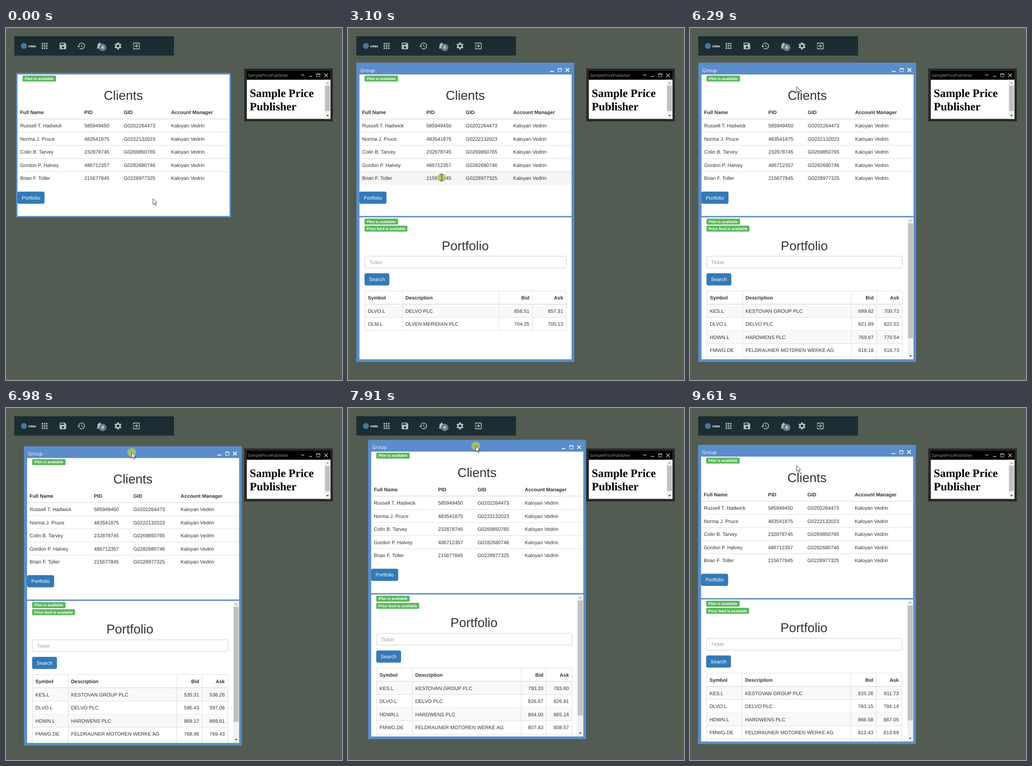
Animation, 732 px wide and 765 px high, one loop 9.69 s. Source, as an HTML page:

```html
<!DOCTYPE html>
<html lang="en">
<head>
<meta charset="utf-8">
<title>Client portfolio windows</title>
<style>
  html, body { margin: 0; width: 732px; height: 765px; overflow: hidden; background: #525c52; }
  svg { display: block; }
  text { font: 10.85px "Liberation Sans", Arial, sans-serif; fill: #333; text-rendering: geometricPrecision; white-space: pre; }
  .b { font-weight: bold; }
  .h1 { font-size: 27.9px; text-anchor: middle; }
  .tag { font-size: 8.13px; font-weight: bold; fill: #fff; text-anchor: middle; }
  .btn { fill: #fff; text-anchor: middle; }
  .hint { fill: #999; }
  .r { text-anchor: end; }
  .ui { font-family: "Open Sans", "Noto Sans", sans-serif; fill: #fff; }
  .serif { font: bold 24.77px "Liberation Serif", "Times New Roman", serif; fill: #000; }
  .line { stroke: #ddd; fill: none; }
  .blue { fill: #5a8dca; }
  .icon { fill: #b4bfc1; }
</style>
</head>
<body>
<svg width="732" height="765" viewBox="0 0 732 765">
  <defs>
    <clipPath id="lower"><rect x="25" y="101" width="462" height="288.5"/></clipPath>
    <clipPath id="torn"><rect x="25" y="101" width="228" height="228"/></clipPath>
    <clipPath id="bottom"><rect x="25" y="411.5" width="462" height="308.5"/></clipPath>
    <linearGradient id="barFill" x2="0" y2="1">
      <stop stop-color="#1a2a31"/><stop offset="1" stop-color="#1e2e34"/>
    </linearGradient>
  </defs>

  <g id="toolbar">
    <rect x="18" y="18" width="348" height="42" fill="url(#barFill)"/>
    <circle cx="39" cy="39" r="6.5" fill="#46789c"/>
    <text class="ui b" x="48.5" y="42" style="font-size:6px">ORBA</text>
    <g class="icon">
      <path transform="translate(74.4 29.4) scale(.8)" d="M4 6h16M4 12h16M4 18h16" stroke="#b4bfc1" stroke-width="4" stroke-dasharray="4 2"/>
      <path transform="translate(114.4 29.4) scale(.8)" d="M17 3H5a2 2 0 0 0-2 2v14a2 2 0 0 0 2 2h14a2 2 0 0 0 2-2V7zM12 19a3 3 0 1 1 0-6 3 3 0 0 1 0 6zM15 9H5V5h10z"/>
      <path transform="translate(154.4 29.4) scale(.8)" d="M13 3a9 9 0 0 0-9 9H1l4 4 4-4H6a7 7 0 1 1 2.06 4.94l-1.42 1.42A9 9 0 1 0 13 3zM12 8v5l4.3 2.5.7-1.2-3.5-2V8z"/>
      <path transform="translate(194.4 29.4) scale(.8)" d="M12 22a2 2 0 0 0 2-2h-4a2 2 0 0 0 2 2zM18 16v-5c0-3-1.6-5.6-4.5-6.3V4a1.5 1.5 0 0 0-3 0v.7C7.6 5.4 6 8 6 11v5l-2 2v1h16v-1z"/>
      <g transform="translate(244 39) scale(.8)" fill="none" stroke="#b4bfc1">
        <circle r="5.5" stroke-width="4"/>
        <circle r="8.2" stroke-width="3.4" pathLength="12" stroke-dasharray="1 1" stroke-dashoffset="-.5"/>
      </g>
      <path transform="translate(274.4 29.4) scale(.8)" d="M10 15.6 11.5 17l5-5-5-5L10 8.4 12.7 11H3v2h9.7zM19 3H5a2 2 0 0 0-2 2v4h2V5h14v14H5v-4H3v4a2 2 0 0 0 2 2h14a2 2 0 0 0 2-2V5a2 2 0 0 0-2-2z"/>
    </g>
    <circle cx="210.7" cy="42.3" r="8" fill="#6b7b87"/>
    <text class="ui b" x="210.7" y="45.4" text-anchor="middle" style="font-size:8.5px">0</text>
  </g>

  <g id="publisher">
    <rect x="519" y="88" width="193" height="115" fill="#282828"/>
    <rect x="524.7" y="93" width="182" height="20"/>
    <rect x="524.7" y="112.5" width="182" height="85" fill="#fff"/>
    <text class="ui" x="527" y="106" style="font-size:8.7px;fill:#a3a3a3">SamplePricePublisher</text>
    <g stroke="#b8b8b8" fill="none" stroke-width="1.6">
      <path d="M643 102.3h7M660 105.3h7M693.5 99l7.5 7.5m0-7.5-7.5 7.5"/>
      <path d="M676.5 106V99.5h7.5V106z" stroke-width="1"/><path d="M676 100h8.5" stroke-width="2"/>
    </g>
    <text class="serif" x="531" y="150.4">Sample Price</text>
    <text class="serif" x="531" y="178.8">Publisher</text>
    <g id="pubScroll"></g>
  </g>

  <g id="win">
    <rect id="solo" class="blue" x="22" y="97.5" width="468" height="314"/>
    <rect id="slab" class="blue" x="18" y="75.5" width="469" height="314"/>
    <g id="frame">
      <rect class="blue" x="18.2" y="75.4" width="474.6" height="650.4"/>
      <text class="ui" x="27" y="95.6">Group</text>
      <g stroke="#fff" fill="none" stroke-width="1.8">
        <path d="M440 94.5h8M474 87.5l8 7.5m0-7.5-8 7.5"/>
        <path d="M457.5 95V88h7.5v7z" stroke-width="1"/><path d="M457 88.5h8.5"/>
      </g>
      <rect x="25" y="411.5" width="462" height="308.5" fill="#fff"/>
    </g>
    <g id="pane"><g id="clients"></g></g>
    <g id="ghost" clip-path="url(#torn)"><use href="#clients" x="-3" y="-22.5"/></g>
    <g id="portfolio" clip-path="url(#bottom)"></g>
  </g>

  <circle id="press" r="9.5" fill="#b5cb57" opacity=".8"/>
  <g id="cursor" stroke-linejoin="round">
    <path id="arrow" d="M0 0v12.5l3-2.7 2.2 4.9 2.1-.9-2.1-4.7h4z" fill="#fff" stroke="#222" stroke-width=".9"/>
    <path id="hand" d="M-1.5 1.2a1.5 1.5 0 0 1 3 0V7l1-.8 1.5.7 1.2-.3 1 .9 1.2.1.6 1v4l-1.5 3v2.6H.5V16l-4.2-5.5c-.8-1.5.8-2.3 2.2-.6z" fill="#fff" stroke="#222"/>
    <path id="beam" d="M-3-6.5h2l1 .8 1-.8h2M0-6V6M-3 6.5h2l1-.8 1 .8h2" fill="none" stroke="#222"/>
  </g>
</svg>

<script>
const LOOP = 9690;
const $ = id => document.getElementById(id);
const show = (id, on) => { $(id).style.display = on ? '' : 'none'; };

// ---- drawing helpers
const text = (x, y, s, cls = '') => `<text x="${x}" y="${y}" class="${cls}">${s}</text>`;
const rect = (x, y, w, h, rest) => `<rect x="${x}" y="${y}" width="${w}" height="${h}" ${rest}/>`;
const line = (d, w = 1) => `<path class="line" d="${d}" stroke-width="${w}"/>`;
const tag = (y, w, s) => rect(36, y, w, 13, 'rx="2" fill="#5cb85c"') + text(36 + w / 2, y + 9.4, s, 'tag');
const button = (x, y, w, s, id) =>
  rect(x + .4, y + .4, w - .8, 25.5, `id="${id}" rx="3" fill="#337ab7" stroke="#2e6da4" stroke-width=".8"`) +
  text(x + w / 2, y + 17, s, 'btn');
const scrollbar = (x, y, h, thumb) => {
  const mid = x + 6.5, end = y + h;
  return rect(x, y, 13, h, 'fill="#f1f1f1"') + rect(x + 1, y + 13, 11, thumb, 'fill="#c1c1c1"') +
    `<path d="M${mid - 3} ${y + 8.5}h6l-3-3.5z" fill="#a3a3a3"/>` +
    `<path d="M${mid - 3} ${end - 8.5}h6l-3 3.5z" fill="#505050"/>`;
};

// ---- clients table
const ROW = 28.5, TOP = 198;
const people = [
  ['Russell T. Hadwick', '585949450', 'G0202264473'],
  ['Norma J. Pruce', '483541875', 'G0222132023'],
  ['Colin B. Tarvey', '232878745', 'G0269850765'],
  ['Gordon P. Halvey', '486712357', 'G0282680746'],
  ['Brian F. Toller', '215677845', 'G0228977325']
];
const clientCols = [30.7, 170.7, 256.6, 359.7];
const cells = (row, y, cls) => row.map((s, i) => text(clientCols[i], y, s, cls)).join('');

$('clients').innerHTML =
  rect(25, 101, 462, 307.5, 'fill="#fff"') + tag(103.2, 73, 'Plim is available') +
  text(255.6, 156, 'Clients', 'h1') +
  rect(25, 0, 462, ROW, 'id="hover" fill="#f5f5f5"') +
  cells(['Full Name', 'PID', 'GID', 'Account Manager'], 187.4, 'b') +
  line('M25 197.75H487', 1.5) +
  people.map((p, i) => cells([...p, 'Kaloyan Vedrin'], 216.4 + i * ROW) +
    (i ? line(`M25 ${TOP + i * ROW}H487`) : '')).join('') +
  button(24.8, 355.6, 59, 'Portfolio', 'open');
$('pubScroll').innerHTML = scrollbar(694, 112.5, 85, 55);

// ---- portfolio table
const kes = ['KES.L', 'KESTOVAN GROUP PLC'];
const del = ['DLVO.L', 'DELVO PLC'];
const har = ['HDWN.L', 'HARDWENS PLC'];
const fel = ['FMWG.DE', 'FELDRAUNER MOTOREN WERKE AG'];
const olv = ['OLM.L', 'OLVEN MERIDIAN PLC'];
const holdings = t => t < 3100 ? [] : t < 4400 ? [del, olv] : t < 5830 ? [kes, har] : [kes, del, har, fel];

const PRICE_TICK = 739;
const rand = n => { const v = Math.sin(n * 127.1 + 11.7) * 43758.5453; return v - Math.floor(v); };
function quote(tick, i) {
  const bid = 500 + 450 * rand(tick * 9 + i), spread = .1 + 1.5 * rand(tick * 9 + i + 50);
  return [bid, bid + spread].map(v => v.toFixed(2));
}

function drawPortfolio(stocks, tick, feed) {
  const long = stocks.length > 2;
  const cols = long ? [36.5, 114.5, 351.5, 406.5, 462.5] : [36.5, 118.5, 329.5, 401.5, 475.5];
  const right = cols[4], y0 = 600.5, count = long ? 5 : stocks.length;
  const row = (c, y, cls) => text(43.2, y, c[0], cls) + text(cols[1] + 6.4, y, c[1], cls) +
    text(cols[3] - 6.5, y, c[2], cls + ' r') + text(right - 6.8, y, c[3], cls + ' r');
  let out = tag(414.2, 73, 'Plim is available') + (feed ? tag(429.6, 93.5, 'Price feed is available') : '') +
    text(long ? 249 : 255.5, 482.5, 'Portfolio', 'h1') +
    rect(36.5, 496, right - 36.5, 25.5, 'rx="3" fill="#fff" stroke="#ccc"') +
    text(46, 512.8, 'Ticker', 'hint') + button(36, 533.2, 54, 'Search', 'search');
  for (let i = 0; i < count; i++) {
    const y = y0 + i * ROW;
    if (i % 2 === 0) out += rect(36.5, y, right - 36.5, ROW, 'fill="#f9f9f9"');
    out += line(`M36.5 ${y + ROW}H${right}`);
    if (stocks[i]) out += row([...stocks[i], ...quote(tick, i)], y + 18.4, '');
  }
  out += row(['Symbol', 'Description', 'Bid', 'Ask'], 589.9, 'b') +
    line(`M36.5 571.5H${right}`) + line(`M36.5 600.25H${right}`, 1.5) +
    line(cols.map(x => `M${x} 571.5V${y0 + count * ROW}`).join(''));
  if (long) out += scrollbar(474, 411.5, 308.5, 250);
  $('portfolio').innerHTML = out;
}

// ---- pointer: each move is start, end, x, y; it rests in between
const START = [320, 371], GRAB = [253, 88.5];
const moves = [
  [150, 1180, 75, 367],
  [1890, 2320, 204, 325],
  [3660, 4020, 213.5, 265.5],
  [4570, 5040, 200, 128],
  [5040, 5580, 190.5, 207.5],
  [5980, 6510, ...GRAB],
  [6670, 6980, 274, 96.5],
  [6980, 7370, 257, 96.5],
  [7370, 7530, 251, 102.5],
  [7530, 7930, 278.5, 82.5],
  [7930, 8110, 261, 89.5],
  [8110, 8770, 252.2, 93],
  [8840, 9470, 232, 125]
];
function pointer(t) {
  return moves.reduce(([x, y], [a, b, u, v]) => {
    const k = Math.min(1, Math.max(0, (t - a) / (b - a))), e = k * k * (3 - 2 * k);
    return [x + (u - x) * e, y + (v - y) * e];
  }, START);
}
const CLICK = 150, clicks = [1230, 2970, 4250, 5660];
const pressed = t => clicks.some(c => t >= c && t < c + CLICK) || (t >= 6510 && t < 8960);

const STEP = LOOP / 126, PIXEL = .774;
const snap = t => Math.floor(t / STEP + .3) * STEP;

let drawn = '';
function render(t) {
  const s = snap(t), [x, y] = pointer(s);
  const solo = t < 1550, grouped = t >= 1640, torn = !solo && !grouped;

  const held = pointer(Math.min(s, 8800));
  const [dx, dy] = held.map((v, i) => t < 6600 ? 0 : Math.round((v - GRAB[i]) / PIXEL) * PIXEL);
  $('win').setAttribute('transform', `translate(${dx} ${dy})`);
  show('solo', solo);
  show('slab', torn);
  show('ghost', torn);
  show('frame', grouped);
  show('portfolio', t >= 1700);
  $('pane').setAttribute('clip-path', torn ? 'url(#lower)' : 'none');

  const stocks = holdings(t), tick = Math.floor(t / PRICE_TICK), feed = t >= 2550;
  const key = [stocks, tick, feed].join();
  if (key !== drawn) drawPortfolio(stocks, tick, feed);
  drawn = key;

  const over = Math.floor((y - dy - TOP) / ROW);
  const inRow = over >= 0 && over < people.length;
  show('hover', inRow);
  if (inRow) $('hover').setAttribute('y', TOP + over * ROW);

  const onButton = x < 84 && y > 356 && y < 382;
  const focus = t >= clicks[0] && t < clicks[1];
  const open = $('open');
  open.setAttribute('fill', focus && onButton ? '#204d74' : focus || onButton ? '#286090' : '#337ab7');
  open.setAttribute('stroke', focus ? '#d3a25f' : onButton ? '#204d74' : '#2e6da4');

  show('hand', onButton);
  show('beam', inRow);
  show('arrow', !onButton && !inRow);
  for (const id of ['cursor', 'press']) $(id).setAttribute('transform', `translate(${x} ${y})`);
  show('press', pressed(t));
}

function tick() {
  render(performance.now() % LOOP);
  requestAnimationFrame(tick);
}
tick();
</script>
</body>
</html>
```
